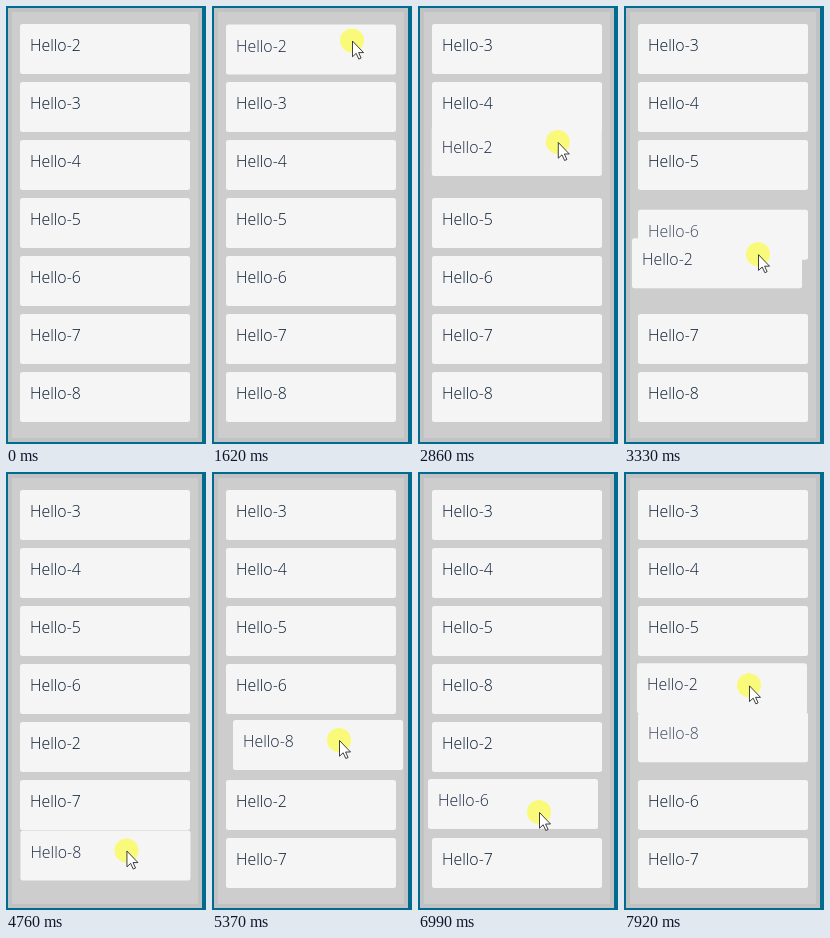
An HTML page that plays this animation: 200x438 px, repeating every 7990 ms.

```html
<!DOCTYPE html>
<html lang="en">
<head>
<meta charset="utf-8">
<title>Sortable list</title>
<style>
  html, body { margin: 0; width: 100%; height: 100%; overflow: hidden; }
  svg { display: block; width: 200px; height: 438px; background: #006b8e; }
  text { font: 350 15.9px "Open Sans", "Noto Sans", sans-serif; fill: #081b30; }
  .held text { fill: #1c2944; }
  .moving text { fill: #3f4963; }
</style>
</head>
<body>
<svg id="stage" viewBox="0 0 200 438">
  <rect x="2" y="2" width="194" height="434" fill="#c0c2c3"/>
  <rect x="6" y="6" width="186" height="426" fill="#cdcdcd"/>
  <g id="pointer">
    <circle id="halo" r="12" fill="#ff0" opacity=".5"/>
    <path d="M.5 .5V16.2L4.2 12.8L6.8 18.5L9.1 17.5L6.6 12H11.5Z" fill="#fff" stroke="#111" stroke-width=".8"/>
  </g>
</svg>
<script>
const LOOP = 7990, STEP = 77.25, CARD_H = 50;
const stage = document.getElementById('stage');
const pointer = document.getElementById('pointer');
const halo = document.getElementById('halo');

const stepStarts = [0, 130, 450, 770, 1320, 1620, 2860, 3820, 5680];

// Pointer glides: start, end, x, y. It rests in between.
const glides = [
  [0, 0, 104, 215], [220, 450, 81, 66], [450, 520, 81, 18], [600, 770, 81, 63],
  [770, 1060, 140, 34], [1580, 2480, 140, 132], [2800, 3340, 134, 248.5],
  [3340, 3640, 137, 262], [3840, 4450, 120, 386], [4640, 5340, 127, 268],
  [5750, 6100, 125, 225], [6265, 6930, 121, 340], [7100, 7460, 126, 272],
  [7700, 8040, 124.6, 190]
];

// Drags: card, press, release
const drags = [[2, 1320, 3820], [8, 4520, 5680], [6, 6150, 7080], [2, 7580, LOOP]];

const clamp = u => Math.max(0, Math.min(u, 1));
const smooth = u => u * u * (3 - 2 * u);
const settle = u => 1 - (1 - u) ** 4;
const mix = (a, b, u) => a + (b - a) * u;
const slotY = slot => 18 + 58 * slot;
const place = (el, { x, y }) => el.setAttribute('transform', `translate(${x} ${y})`);

function pointerAt(t) {
  const p = { x: 0, y: 0 };
  for (const [start, end, x, y] of glides) {
    if (t < start) break;
    const u = end > start ? smooth(clamp((t - start) / (end - start))) : 1;
    p.x = mix(p.x, x, u);
    p.y = mix(p.y, y, u);
  }
  return p;
}

function stepped(t) {
  const start = stepStarts.filter(s => s <= t).pop();
  return start + Math.floor((t - start) / STEP + 0.05) * STEP;
}

// A neighbour gives way once the dragged card's edge passes its centre.
function planMoves() {
  const order = [2, 3, 4, 5, 6, 7, 8], moves = [];
  const center = slot => slotY(slot) + CARD_H / 2;
  for (const [card, press, release] of drags) {
    let slot = order.indexOf(card);
    const offset = slotY(slot) - pointerAt(press).y;
    for (let time = press; time < release; time += 2) {
      const top = pointerAt(time).y + offset;
      const down = slot < order.length - 1 && top + CARD_H > center(slot + 1);
      const up = slot > 0 && top < center(slot - 1);
      if (!down && !up) continue;
      const next = slot + (down ? 1 : -1);
      moves.push({ card: order[next], time, slot });
      [order[slot], order[next]] = [order[next], card];
      slot = next;
    }
    moves.push({ card, time: press, release, slot });
  }
  return moves;
}
const moves = planMoves();

function cardAt(card, t) {
  let x = 14, y = slotY(card - 2), state = '';
  for (const move of moves) {
    if (move.card !== card || t < move.time) continue;
    let since = t - move.time;
    state = since < 200 ? 'moving' : '';
    if (move.release) {
      const grab = pointerAt(move.time), at = pointerAt(Math.min(t, move.release));
      x += at.x - grab.x;
      y += at.y - grab.y;
      since = t - move.release;
      state = since < 0 ? 'held' : '';
    }
    const u = settle(clamp(since / 200));
    x = mix(x, 14, u);
    y = mix(y, slotY(move.slot), u);
  }
  return { x, y, state };
}

function makeCard(n) {
  const el = document.createElementNS(stage.namespaceURI, 'g');
  el.innerHTML = `<rect width="170" height="${CARD_H}" rx="2.5" fill="#f5f5f5"/><text x="10" y="27">Hello-${n}</text>`;
  stage.insertBefore(el, pointer);
  return { n, el };
}
const cards = [2, 3, 4, 5, 6, 7, 8].map(makeCard);

function draw() {
  const now = (performance.now() - begin) % LOOP, t = stepped(now);
  for (const { n, el } of cards) {
    const pose = cardAt(n, t);
    place(el, pose);
    el.setAttribute('class', pose.state);
  }
  const drag = drags.filter(d => d[1] <= t).pop();
  if (drag) {
    const top = cards.find(c => c.n === drag[0]).el;
    if (top.nextElementSibling !== pointer) stage.insertBefore(top, pointer);
  }
  place(pointer, pointerAt(t));
  const shown = (now >= 130 && now < 220) || (now >= 450 && now < 600) || now >= 770;
  pointer.style.display = shown ? '' : 'none';
  halo.style.display = drag && t < drag[2] ? '' : 'none';
  requestAnimationFrame(draw);
}
const begin = performance.now();
draw();
</script>
</body>
</html>
```
